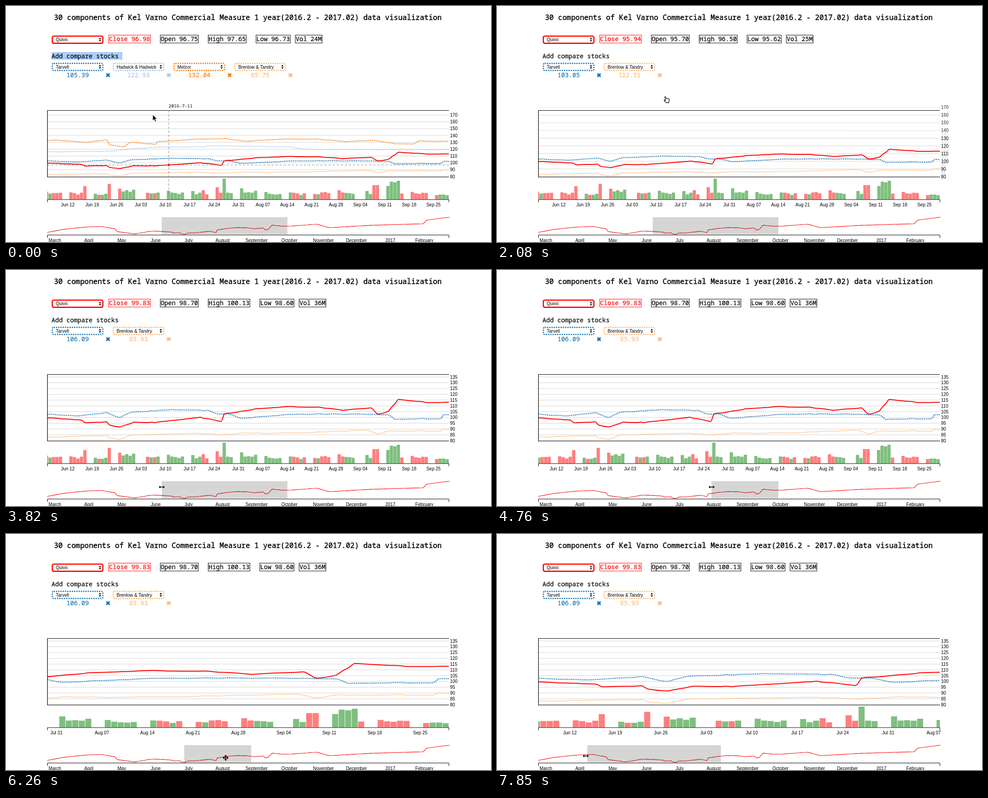
An HTML page for the animation above (8 s loop, 1071 px wide and 523 px high).

```html
<!DOCTYPE html>
<html lang="en">
<head>
<meta charset="utf-8">
<title>Stock comparison chart</title>
<style>
  html, body { margin: 0; width: 100%; height: 100%; overflow: hidden; background: #fff; }
  svg { display: block; width: 100vw; height: 100vh; }
  text { font: 10px "Liberation Sans", Arial, sans-serif; fill: currentColor; }
  .mono { font: 13.73px "Noto Sans Mono", monospace; white-space: pre; stroke: currentColor; stroke-width: .2; }
  .title { font-size: 16.05px; stroke-width: .4; }
  .date { font-size: 9.8px; stroke: none; }
  .mid { text-anchor: middle; }
</style>
</head>
<body>
<svg id="stage" viewBox="0 0 1071 523"></svg>
<script>
const LOOP = 8000, LEFT = 91, RIGHT = 978, BASE = 378;
const stage = document.getElementById('stage');

const clamp = v => Math.max(0, Math.min(1, v));
const mix = (a, b, p) => a + (b - a) * p;
const ease = u => (u = clamp(u)) < .5 ? 4 * u ** 3 : 1 - 4 * (1 - u) ** 3;
const wobble = i => { const n = Math.sin(i * 12.99) * 43758.5; return n - Math.floor(n) - .5; };

// Screen updates come in runs: first time, last time, count.
const RUNS = [[120, 1110, 9], [1230, 1460, 3], [1700, 2230, 5], [2380, 2700, 3], [3000, 3820, 8], [4080, 4760, 6],
  [5180, 5610, 4], [5760, 6140, 4], [6260, 6850, 5], [7000, 7300, 3], [7420, 7850, 5]];

function snap(t) {
  const run = RUNS.findLast(r => t >= r[0]);
  if (!run) return 0;
  const [a, b, n] = run, step = (b - a) / (n - 1);
  return Math.min(b, a + Math.floor((t - a) / step + .1) * step);
}

// Day 0 is Monday 6 June 2016.
const HOLIDAYS = [28, 91];
const isTrading = d => (d + 700) % 7 < 5 && !HOLIDAYS.includes(d);
const dayOf = (year, month) => (Date.UTC(year, month, 1) - Date.UTC(2016, 5, 6)) / 864e5;
const dayText = (d, format) => new Date(Date.UTC(2016, 5, 6 + d)).toLocaleString('en-US', { ...format, timeZone: 'UTC' });

// Daily prices from a few "day:price" turning points plus seeded noise.
function series(keys, noise) {
  const k = keys.split(' ').map(s => s.split(':').map(Number)), out = [];
  for (let d = k[0][0], i = 0; d <= k.at(-1)[0]; d++) {
    while (i < k.length - 2 && d > k[i + 1][0]) i++;
    const [[d0, v0], [d1, v1]] = [k[i], k[i + 1]];
    if (isTrading(d)) out.push([d, mix(v0, v1, (d - d0) / (d1 - d0)) + noise * wobble(d)]);
  }
  return out;
}

const MAIN = series('-104:97 -89:105 -67:111 -54:112 -42:106 -40:99 -24:93 -9:100.5 3:99.3 10:97.5 11:95.3 17:96.1 18:93.4 ' +
  '21:92 25:95.8 31:95.7 44:100 50:96.7 51:103 60:107.3 70:109.3 78:108.8 85:106.2 93:108.2 95:103.1 98:105.4 101:115.6 ' +
  '109:113 118:113 142:118 153:109 190:115 239:119 242:128 263:136', .4);

const OTHERS = [
  { name: 'Tarvell', color: '#1f77b4', until: LOOP,
    keys: '-3:103.5 9:101.2 17:104 21:100.3 24:104.5 36:106.7 46:106 49:103.3 54:102.3 56:99.3 66:101.5 72:103 93:102.7 98:102.3 100:98.5 113:99 114:102.3 118:102' },
  { name: 'Hadwick &amp; Hadwick', color: '#aec7e8', until: 1110, keys: '-3:116 18:117 24:120.5 32:123 45:123.5 47:125.5 70:123 75:119.5 118:119.3' },
  { name: 'Melzor', color: '#ff7f0e', until: 1700,
    keys: '-3:132 3:133.3 11:129.8 17:133.6 18:126.8 22:123.5 24:130 31:127.3 32:131 43:134.5 51:135.5 57:131.7 69:134.8 77:134.8 86:131 94:133 100:128 105:127.7 107:132 118:131.5' },
  { name: 'Brenlow &amp; Tandry', color: '#ffbb78', until: LOOP,
    keys: '-3:82.3 3:83.2 17:84.2 18:82.5 21:81.3 24:84.8 43:86.2 51:85 57:86.8 63:86 79:87.4 92:88.9 95:86 98:88.3 113:88.3 114:90 118:88.5' }
].map(o => ({ ...o, pts: series(o.keys, .5) }));

const QUOTES = [
  { from: 0, day: 35, date: '2016-7-11', row: ['96.98', '96.75', '97.65', '96.73', '24M'], vals: ['105.39', '122.93', '132.04', '85.75'] },
  { from: 120, day: 31, date: '2016-7-7', row: ['95.94', '95.70', '96.50', '95.62', '25M'], vals: ['103.05', '122.51', '127.17', '85.40'] },
  { from: 2380, day: 42, date: '2016-7-18', row: ['99.83', '98.70', '100.13', '98.60', '36M'], vals: ['106.09', '85.93'] }
];

// Moves are start, end, then the pair of values reached.
const VIEWS = [[343, 622.2], [472.5, 622.2], [345.5, 495.2]];
const BRUSH = [[4080, 4760, ...VIEWS[1]], [5760, 6554, ...VIEWS[2]], [7420, 7850, 198.5, 495.2]];
const POINTER = [[120, 1110, 359, 155, 'hand'], [1700, 2530, 406, 319, 'arrow'], [3000, 3820, 344, 481, 'resize'],
  [4080, 4760, 474, 481, 'resize'], [5180, 5610, 565, 496, 'move'], [5760, 6554, 438, 496, 'move'],
  [6554, 6850, 346, 493, 'resize'], [7420, 7850, 196, 492, 'resize']];

function glide(from, moves, q) {
  let [x, y, kind] = from;
  for (const [a, b, x1, y1, k] of moves) {
    const p = clamp((q - a) / (b - a));
    x = mix(x, x1, p);
    y = mix(y, y1, p);
    if (p > .5) kind = k;
  }
  return [x, y, kind];
}

const overX = d => LEFT + (d + 104) * 2.421;
const overY = v => 500 - (v - 99) * .87;
const inside = (v, d) => overX(d) >= v[0] && overX(d) <= v[1];

// Zoom transition at time q; lead starts it earlier for some parts.
function zoom(q, lead = 0) {
  const i = q < 6400 ? 0 : 1, a = VIEWS[i], b = VIEWS[i + 1];
  const u = q < 5180 ? .12 * clamp((q - 4080) / 680) : (q - (i ? 6570 : 5077) + lead) / 750;
  const place = (v, d) => LEFT + (RIGHT - LEFT) * (overX(d) - v[0]) / (v[1] - v[0]);
  const p = ease(u);
  return { a, b, p, x: d => mix(place(a, d), place(b, d), p) };
}

const line = (d, color = '#000', extra = '') => `<path d="${d}" fill="none" stroke="${color}" ${extra}/>`;
const rect = (x, y, w, h, attrs = '') => `<rect x="${x}" y="${y}" width="${w}" height="${h}" ${attrs}/>`;
const text = (s, x, y, cls = '', attrs = '') => `<text x="${x}" y="${y}" class="${cls}" ${attrs}>${s}</text>`;

// Monotone cubic through the points.
function curve(pts, X, Y) {
  const p = pts.map(([d, v]) => [X(d), Y(v)]);
  const s = p.slice(1).map((c, i) => (c[1] - p[i][1]) / (c[0] - p[i][0]));
  const m = p.map((_, i) => {
    const a = s[i - 1] ?? s[i], b = s[i] ?? a;
    return a * b <= 0 ? 0 : 2 * a * b / (a + b);
  });
  return p.map(([x, y], i) => {
    if (!i) return `M${x.toFixed(2)} ${y.toFixed(2)}`;
    const [x0, y0] = p[i - 1], h = (x - x0) / 3;
    return 'C' + [x0 + h, y0 + m[i - 1] * h, x - h, y - m[i] * h, x, y].map(v => v.toFixed(2)).join(' ');
  }).join('');
}

function selectBox(x, y, name, attrs) {
  return rect(x + 1.3, y + 1.3, 111.6, 15.8, `rx="3" fill="#fff" stroke-width="2.6" ${attrs}`) +
    text(name, x + 9, y + 12.7) +
    `<path d="M${x + 104} ${y + 8}h5l-2.5-3.6zM${x + 104} ${y + 10}h5l-2.5 3.6z"/>`;
}

function header(q, quote) {
  let out = text('30 components of Kel Varno Commercial Measure 1 year(2016.2 - 2017.02) data visualization', 106, 30.5, 'mono title');
  out += selectBox(101, 65.5, 'Quivo', 'stroke="red"');
  let x = 226.8;
  ['Close', 'Open', 'High', 'Low', 'Vol'].forEach((k, i) => {
    const s = `${k} ${quote.row[i]}`, w = s.length * 8.24 + 1.6, c = i ? '#000' : 'red';
    out += rect(x, 64.5, w, 17.5, `fill="none" stroke="${c}"`) + text(s, x + .8, 78, 'mono', `color="${c}"`);
    x += w + (i === 3 ? 11 : 21.7);
  });
  if (q < 860) out += rect(100.5, 102, 156.5, 17, 'fill="#accef7"');
  out += text('Add compare stocks', 100.5, 116, 'mono');
  OTHERS.filter(o => q < o.until).forEach((o, i) => {
    const left = 101 + i * 134.3;
    out += selectBox(left, 125.8, o.name, `stroke="${o.color}" stroke-dasharray="2.8 2.2"`) +
      text(quote.vals[i], left + 57.3, 158, 'mono mid', `color="${o.color}"`) +
      line(`M${left + 120.7} 149.7l7 7m0-7l-7 7`, o.color, 'stroke-width="3.4"');
  });
  return out;
}

function priceAxis(yp, Y) {
  let out = '';
  for (let v = 80; v <= 170; v += 5) {
    const o = mix(v % 10 ? 0 : 1, v <= 135 ? 1 : 0, yp), y = Y(v);
    if (o > 0) out += `<g opacity="${o}">` + line(`M${LEFT} ${y}H${RIGHT}`, '#d3d3d3') + text(v, 980.5, y + 3.6) + '</g>';
  }
  return out;
}

// Bars grow with the size of the day's move.
function volume(z) {
  const step = z.x(1) - z.x(0);
  return MAIN.slice(1).map(([d, v], i) => {
    const move = v - MAIN[i][1], h = Math.min(46, 11 + 8 * Math.abs(move) + 4 * wobble(d + 7));
    return rect(z.x(d) - step * .56, 428.5 - h, step * .93, h, `fill="${move > 0 ? '#7fbf7f' : '#ff7f7f'}"`);
  }).join('');
}

function dateAxis(q, z) {
  const entering = zoom(q, 40);
  let out = line(`M${LEFT + .5} 435V429H${RIGHT}V435`);
  for (let d = -1; d <= 118; d += 7) {
    const was = inside(z.a, d), is = inside(z.b, d), o = mix(+was, +is, z.p);
    if (o > .01) out += text(dayText(d, { month: 'short', day: '2-digit' }), (was ? z : entering).x(d), 444, 'mid', `opacity="${o}"`);
  }
  return out;
}

function crosshair(quote, X, Y) {
  const x = X(quote.day), y = Y(+quote.row[0]), dash = 'stroke-dasharray="5 4"';
  return line(`M${x} 231V423`, '#888', dash) + line(`M${LEFT} ${y}H${RIGHT}`, '#888', dash) +
    `<circle cx="${x}" cy="${y}" r="2.5" fill="red"/>` + text(quote.date, x - .5, 225, 'mono date');
}

const yearPath = 'M' + MAIN.map(([d, v]) => `${overX(d).toFixed(1)} ${overY(v).toFixed(1)}`).join('L');

function overview(q) {
  const [lo, hi] = glide(VIEWS[0], BRUSH, q);
  let out = line(yearPath, 'red', 'stroke-width="1.1"') + rect(lo + .9, 468, hi - lo - 1.7, 38, 'opacity=".165"');
  out += line(`M${LEFT + .5} 514V507.5H${RIGHT}V514`);
  for (let m = 2; m < 14; m++) {
    const d = dayOf(2016, m);
    out += text(m === 12 ? 2017 : dayText(d, { month: 'long' }), overX(d), 522.7, 'mid');
  }
  return out;
}

const DOUBLE = 'M-6.5 0l3.2-3.2v2.400h6.600v-2.400l3.2 3.2-3.2 3.2v-2.400h-6.600v2.400z';
const CURSORS = {
  arrow: '<path d="M0 0V13l3-2.8 2.3 5 2.2-1-2.2-4.7h4.2z" stroke="#fff" stroke-width=".8"/>',
  hand: '<path d="M-3.5-6q1.5-1 2.2 1l1 3q1.5-1.2 2.5 0 1.5-.8 2.2.4 1.8-.4 2 1.6 0 3-1 4.5v2.5h-6.5q-1-2.5-3.8-4.8-.6-1.6 1.3-1.2l1.5 1z" fill="#fff" stroke="#000" stroke-width="1.2"/>',
  resize: `<path d="${DOUBLE}"/>`,
  move: `<path d="${DOUBLE}"/><path d="${DOUBLE}" transform="rotate(90)"/>`
};

function pointer(q) {
  const [x, y, kind] = glide([324, 241, 'arrow'], POINTER, q);
  return `<g transform="translate(${x} ${y})">${CURSORS[kind]}</g>`;
}

function scene(q) {
  const quote = QUOTES.findLast(k => q >= k.from);
  const yp = ease((q - 1700) / 750), scale = mix(1.517, 2.564, yp);
  const Y = v => BASE - (v - 80) * scale;
  const z = zoom(q), side = zoom(q, 134);
  const dots = OTHERS.filter(o => q < o.until)
    .map(o => line(curve(o.pts, side.x, Y), o.color, 'stroke-width="2.1" stroke-dasharray="2.3 1.8"')).join('');
  const hover = q < 300 || (q >= 2380 && q < 3300);
  return `<defs><clipPath id="plot">${rect(LEFT, 200, RIGHT - LEFT, 230)}</clipPath></defs>` +
    header(q, quote) + priceAxis(yp, Y) +
    `<g clip-path="url(#plot)">${volume(z)}${dots}${line(curve(MAIN, z.x, Y), 'red', 'stroke-width="2"')}</g>` +
    line(`M${RIGHT} 231.5H${LEFT + .5}V379H${RIGHT}`, '#000', 'stroke-width="1.2"') +
    dateAxis(q, z) + (hover ? crosshair(quote, z.x, Y) : '') + overview(q) + pointer(q);
}

const start = performance.now();
let shown = -1;
function tick() {
  const q = snap((performance.now() - start) % LOOP);
  if (q !== shown) stage.innerHTML = scene(shown = q);
  requestAnimationFrame(tick);
}
tick();
</script>
</body>
</html>
```
